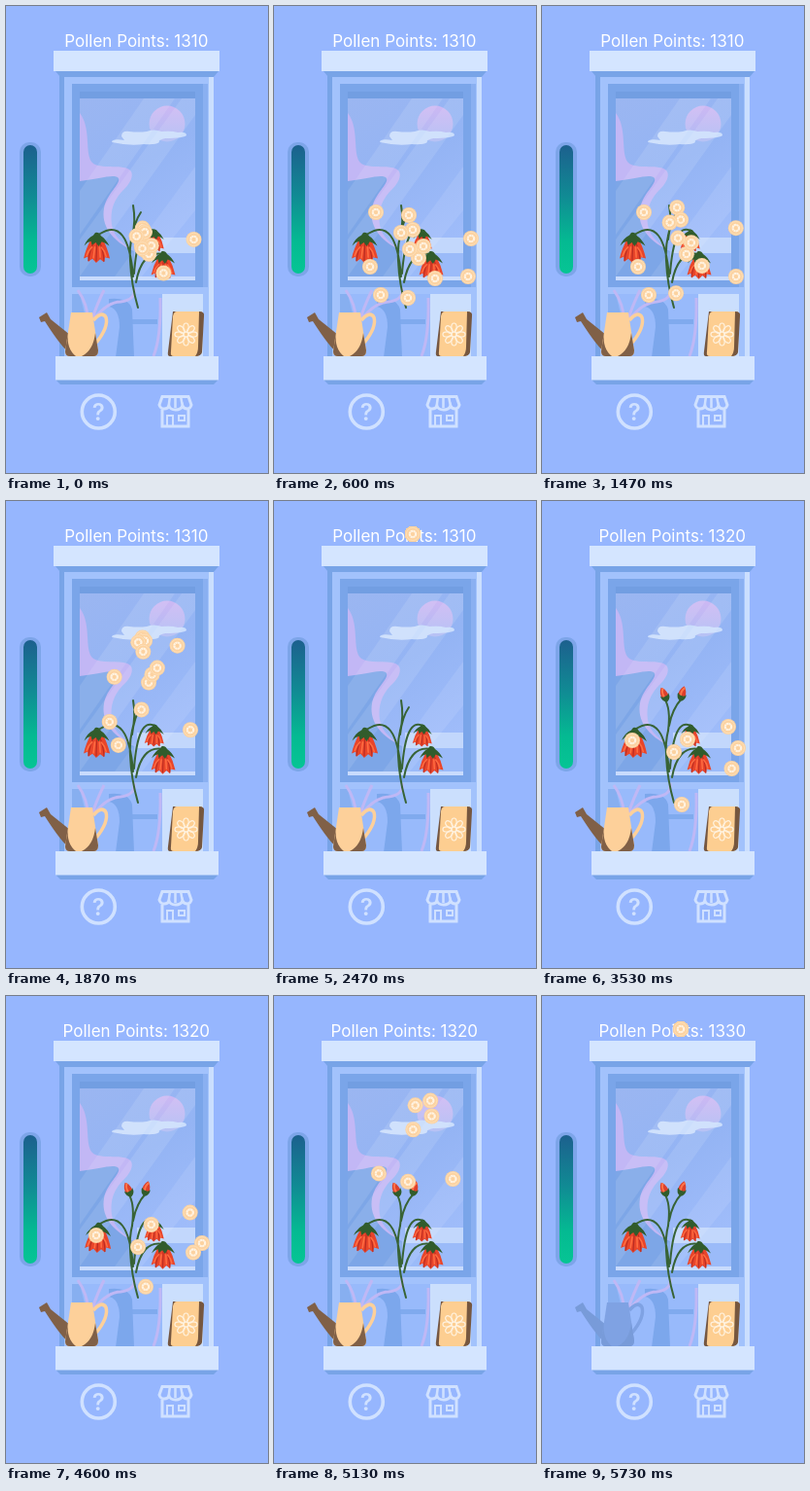
An HTML page that plays this animation: 270 by 480 pixels, repeating every 5.79 s.

```html
<!DOCTYPE html>
<html lang="en">
<head>
<meta charset="utf-8">
<title>Window garden</title>
<style>
html, body { margin: 0; width: 100%; height: 100%; overflow: hidden; background: #96b6fe; }
svg { display: block; width: 100%; height: 100%; }
text { font-family: Inter, Roboto, sans-serif; text-anchor: middle; }
</style>
</head>
<body>
<svg viewBox="0 0 270 480" preserveAspectRatio="xMidYMid slice">
  <defs>
    <linearGradient id="meter" x2="0" y2="1">
      <stop stop-color="#1c608e"/><stop offset=".4" stop-color="#108b94"/>
      <stop offset=".75" stop-color="#04ba92"/><stop offset="1" stop-color="#06c594"/>
    </linearGradient>
    <linearGradient id="glass" x2=".4" y2="1">
      <stop stop-color="#9bb6f1"/><stop offset=".5" stop-color="#94b4f4"/><stop offset="1" stop-color="#9fbcfa"/>
    </linearGradient>
    <linearGradient id="sun" x2="0" y2="1">
      <stop stop-color="#cdb8f3"/><stop offset="1" stop-color="#aebbf4"/>
    </linearGradient>
    <clipPath id="pane"><path d="M76 95H195V278H76Z"/></clipPath>
    <g id="coin">
      <circle r="8" fill="#fcd2a0"/>
      <circle r="6.6" fill="none" stroke="#fde0ba" stroke-width=".9"/>
      <circle r="3.2" fill="none" stroke="#fff3e2" stroke-width="2.2" stroke-dasharray="2.2 .32"/>
    </g>
    <g id="bell">
      <path d="M-6 -7Q-11 2 -13 13L-9 11L-8 16L-4 13L0 17L4 13L8 16L9 11L14 12Q11 1 6 -7Z" fill="#e8452a"/>
      <path d="M-3 -4Q-7 4 -8 15M3 -4Q7 4 8 15M0 -5V15" fill="none" stroke="#b92d22" stroke-width="1.2"/>
      <path d="M-5 1Q-9 5 -10 10M5 1Q9 5 10 10M-2 1L-3 12M3 1L4 11" fill="none" stroke="#ff6d42" stroke-width="1.6"/>
      <path d="M-2 -14Q2 -15 4 -11Q9 -8 13 -1Q8 -4 5 -5L2 0L-1 -4L-5 -1L-6 -5Q-10 -4 -13 0Q-10 -8 -4 -11Z" fill="#315c2c"/>
    </g>
    <g id="bud">
      <path d="M-3.500 4Q-5 -3 0 -8Q5 -3 3.500 4Z" fill="#dc402c"/>
      <path d="M-1 3Q-2 -3 1 -6" fill="none" stroke="#ff7448"/>
      <path d="M-4.500 0Q-2 3 0 2Q3 3 4.500 0Q5 6 0 8Q-5 6 -4.500 0Z" fill="#315c2c"/>
    </g>
  </defs>

  <rect width="270" height="480" fill="#96b6fe"/>
  <rect x="14" y="140" width="22" height="138" rx="10" fill="#7da5e9"/>
  <rect x="18" y="143" width="14" height="132" rx="7" fill="url(#meter)"/>

  <path d="M55 66H214V361H55Z" fill="#a2c2fc"/>
  <path d="M55 66H60V361H55Z" fill="#78a4e7"/>
  <path d="M209 66H214V361H209Z" fill="#cbdffe"/>
  <path d="M51 67H219L214 73H56Z" fill="#78a4e7"/>
  <path d="M68 80H208V289H68Z" fill="#8ab0f1"/>
  <path d="M68 80H203V289H68Z" fill="#7aa5e9"/>
  <path d="M76 88H195V95H76Z" fill="#729ee2"/>
  <rect x="76" y="95" width="119" height="183" fill="url(#glass)"/>
  <g clip-path="url(#pane)">
    <path d="M76 177Q100 172 116 175Q119 182 109 192Q99 207 104 224Q110 239 132 252V278H76Z" fill="#7da6e7"/>
    <circle cx="166" cy="121" r="18.500" fill="url(#sun)"/>
    <path d="M119 134Q119 128 127 129Q137 130 145 129Q152 126 160 129Q171 128 177 130Q186 129 186 133Q183 136 164 136Q156 138 158 140Q154 143 142 142Q127 144 109 140Q109 136 122 138Z" fill="#cbdefc"/>
    <path d="M76 110C88 126 81 149 88 160C94 168 114 163 125 167C133 170 130 180 123 187C111 198 107 210 109 225C111 238 122 245 132 252C108 241 98 225 101 208C104 192 118 184 116 177C112 172 96 178 76 180Z" fill="#c2b7f5"/>
    <path d="M135 238H196V254H135Z" fill="#c2d7fc"/>
    <path d="M135 254H196V278H135Z" fill="#9bbbf9"/>
    <g fill="#fff">
      <path d="M142 95H174L76 235V190Z" opacity=".1"/>
      <path d="M181 95H195V112L76 278V240Z" opacity=".1"/>
      <path d="M195 165V210L140 278H112Z" opacity=".09"/>
    </g>
  </g>
  <path d="M76 278H195V282H76Z" fill="#c8dbfd"/>

  <path d="M68 296H161V361H68Z" fill="#98bafb"/>
  <path d="M127 322H156V327H127Z" fill="#80aaee"/>
  <path d="M106 301Q127 299 130 312L132 361H113L117 330Q117 311 106 309Z" fill="#7ca7ec"/>
  <path d="M68 296H76L92 361H68Z" fill="#87aff0"/>
  <g fill="none" stroke="#bfb8f5" stroke-width="3">
    <path d="M85 325Q84 306 74 292M88 324Q94 306 101 292M90 322Q105 304 118 304Q134 302 132 290M159 300Q160 340 152 360"/>
  </g>
  <path d="M161 296H203V361H161Z" fill="#cbdffd"/>
  <path d="M49 46H220V67H49Z" fill="#d4e5ff"/>
  <path d="M51 384H219L214 389H56Z" fill="#78a4e7"/>
  <path d="M51 360H219V384.500H51Z" fill="#d4e5ff"/>

  <g id="plant" fill="none" stroke="#386335" stroke-width="2" stroke-linecap="round"></g>
  <g id="can"></g>
  <g id="dim"></g>

  <path d="M172 314H179L173 360H169Q166 360 167 355Z" fill="#755741"/>
  <path d="M176 314H200Q204 314 203 319L201 356Q200 360 196 360H173Q169 360 170 355L172 319Q173 314 176 314Z" fill="#fdce91"/>
  <path d="M199 314Q205 314 204 319L202 356Q201 360 195 360Q198 356 198 350Z" fill="#76573f"/>
  <g id="rosette" fill="none" stroke="#fff2df" stroke-width="1.2" transform="translate(185.500 337.500)"></g>

  <g fill="none" stroke="#d0e1ff" stroke-width="3.600">
    <circle cx="95.300" cy="417" r="17"/>
    <path d="M161 415V432H188V415" stroke-width="3"/>
    <path d="M166 432V421H172V432M178 421H184V426H178Z" stroke-width="2"/>
    <path d="M161 401.500H188L191 410Q190 414 187 414Q183 414 182 411Q180 415 175 415Q169 415 168 411Q167 414 163 414Q159 414 158 410Z" stroke-width="3"/>
    <path d="M169 401L167.500 412M174.500 401V413M180 401L182 412" stroke-width="2.500"/>
  </g>
  <text x="95.300" y="425.500" font-size="24" font-weight="600" fill="#d0e1ff">?</text>

  <text id="score" x="134.300" y="42" font-size="17" fill="#fff"></text>
  <g id="coins"></g>
</svg>
<script>
const LOOP = 5790, HOME = [143, 245], GOAL = [143, 34];
const BURST = 400, FLY = 922, ROUND = 3141;
const GROW = 2901, SCORE = 2529;
const el = id => document.getElementById(id);
const clamp = v => Math.max(0, Math.min(1, v));
const mix = (a, b, k) => a + (b - a) * k;
const show = (node, on) => { node.style.display = on ? "" : "none"; };

// Each spot: x, y, delay of the burst, delay of the flight.
const rounds = [
  [[105, 212, 226, 226], [99, 268, 226, 226], [110, 297, 226, 226], [200, 278, 226, 226],
    [138, 300, 220, 89], [149, 259, 60, 89], [154, 247, 89, 89],
    [139, 215, 110, 20], [143, 230, 0, 0], [131, 233, 60, 0],
    [140, 250, 0, 0], [166, 280, 0, 0], [203, 239, 0, 0]],
  [[93, 246, 226, 226], [136, 258, 226, 226], [202, 254, 226, 226],
    [195.5, 275, 0, 0], [144, 312, 89, 0], [150, 245, 0, 0], [192, 232, 0, 0]]
];

const bell = (x, y, s, r) =>
  `<use href="#bell" stroke="none" transform="translate(${x} ${y}) rotate(${r}) scale(${s})"/>`;
const bud = (x, y, r) =>
  `<use href="#bud" stroke="none" transform="translate(${x} ${y}) rotate(${r})"/>`;

el("plant").innerHTML = `
  <path d="M136 310Q129 286 128 262Q127 248 130 236M131 278Q126 216 97 234M132 275Q136 222 153 231M134 284Q140 251 162 255"/>
  <g id="young">
    <path d="M130 236Q134 222 131 205M130 240Q132 222 139 212"/>
    ${bell(93.5, 247, 1, 2)}
  </g>
  <g id="grown">
    <path d="M130 236Q133 213 126 203M131 231Q134 214 144 203"/>
    ${bell(95, 247, 1, 4)}${bud(126, 199, -25)}${bud(144.5, 198, 15)}
  </g>
  ${bell(153, 240, .74, 4)}${bell(162, 265, .92, 2)}`;

const can = (light, dark) => `
  <path d="M90 323Q99 313 103 320Q106 330 93 346" fill="none" stroke="${light}" stroke-width="3.5"/>
  <path d="M34 320L42 315L46 322L66 338V357Q58 352 40 324L36 325Z" fill="${dark}"/>
  <path d="M67 315H89L95 354Q95 360 90 360H66Q61 360 61 355Z" fill="${light}"/>
  <path d="M64 336Q62 352 72 360H66Q61 360 61 355ZM92 336L95 354Q95 360 90 360H78Q90 354 92 336Z" fill="${dark}"/>`;
el("can").innerHTML = can("#fdd09a", "#806047");
el("dim").innerHTML = can("#7fa2e3", "#789bd9");

let petals = '<circle r="2.5"/>';
for (let a = 0; a < 360; a += 45)
  petals += `<ellipse cy="-7" rx="2.700" ry="4.500" transform="rotate(${a})"/>`;
el("rosette").innerHTML = petals;

const coins = rounds.flatMap((spots, i) => spots.map(([x, y, wait, hold]) => {
  const node = document.createElementNS("http://www.w3.org/2000/svg", "use");
  node.setAttribute("href", "#coin");
  el("coins").append(node);
  const from = i * ROUND;
  return { node, x, y, burst: from - 240 + wait, lift: from + 1259 + hold, end: from + 2600 };
}));

function place(c, t) {
  const out = clamp((t - c.burst) / BURST);
  const up = clamp((t - c.lift) / FLY) ** 2;
  const k = 1 - (1 - out) ** 2;
  const x = mix(mix(HOME[0], c.x, k), GOAL[0], up);
  const y = mix(mix(HOME[1], c.y, k), GOAL[1], up);
  c.node.setAttribute("transform", `translate(${x} ${y})`);
  show(c.node, out > 0 && t < c.end);
}

// The can is dimmed while pressed, shortly before each burst.
const press = (t, down, up) => clamp((t - down) / 100) * clamp((up - t) / 100);

function draw(t) {
  show(el("young"), t < GROW);
  show(el("grown"), t >= GROW);
  const dim = press(t, 2490, 3050) + press(t, 5500, LOOP + 100);
  el("can").style.opacity = 1 - dim;
  el("dim").style.opacity = dim;
  const gained = t < SCORE ? 0 : t < SCORE + ROUND ? 10 : 20;
  el("score").textContent = "Pollen Points: " + (1310 + gained);
  coins.forEach(c => place(c, t));
}

const t0 = performance.now();
function tick() {
  draw((performance.now() - t0) % LOOP);
  requestAnimationFrame(tick);
}
tick();
</script>
</body>
</html>
```
